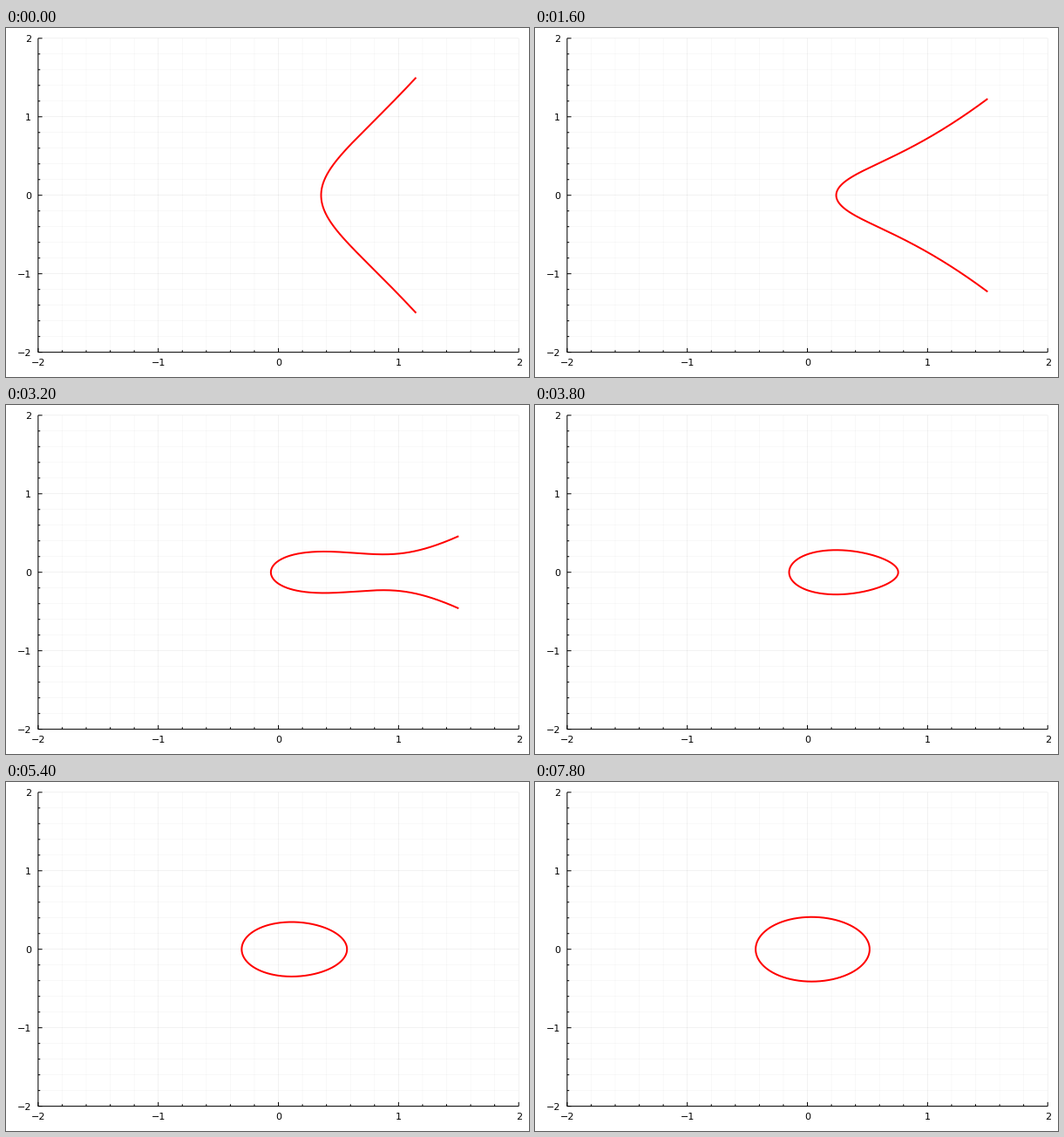
A matplotlib script for the animation above (8000 ms loop, 600 by 400 pixels).

```python
import numpy as np
import matplotlib.pyplot as plt
from matplotlib.animation import FuncAnimation
from matplotlib.collections import LineCollection

W, H, DPI = 600, 400, 100
LEFT, RIGHT, TOP, BOTTOM = 36.87, 588.19, 11.81, 371.61
FRAMES, STEPS = 40, 50
LIMIT = 1.5          # the curve is only traced for |x|, |y| <= LIMIT
PX = 72 / DPI        # one pixel in points


def sx(x):
    return LEFT + (x + 2) * (RIGHT - LEFT) / 4


def sy(y):
    return BOTTOM - (y + 2) * (BOTTOM - TOP) / 4


def real_roots(poly):
    r = np.roots(poly)
    return np.sort(r[np.abs(r.imag) < 1e-7].real)


def curve(p):
    """Zero set of (1-p)(y^2 - x^3 - x + 0.4) + p(4x^2 + 5y^2 - 1)."""
    q = 1 - p
    scale = q + 5 * p
    poly = np.array([q, -4 * p, q, p - 0.4 * q]) / scale
    roots = real_roots(poly)
    a = roots[0]
    closed = len(roots) > 1 and roots[1] < LIMIT
    u = np.linspace(0, 1, 250)
    if closed:
        x = a + (roots[1] - a) * (1 - np.cos(np.pi * u)) / 2
    else:
        top = real_roots(poly - [0, 0, 0, LIMIT ** 2])
        b = min([LIMIT] + [r for r in top if r > a])
        x = a + (b - a) * u ** 2
    y = np.sqrt(np.maximum(np.polyval(poly, x), 0))
    y[0] = 0
    if closed:
        y[-1] = 0
    return np.r_[x[::-1], x[1:]], np.r_[y[::-1], -y[1:]]


fig = plt.figure(figsize=(W / DPI, H / DPI), dpi=DPI, facecolor="white")
ax = fig.add_axes([0, 0, 1, 1])
ax.set_xlim(0, W)
ax.set_ylim(H, 0)
ax.axis("off")


def strokes(segs, width, alpha, z):
    lines = LineCollection(segs, colors="black", linewidths=width * PX,
                           alpha=alpha, zorder=z, capstyle="butt")
    lines.set_snap(False)
    ax.add_collection(lines, autolim=False)


def grid(values):
    return ([[(sx(v), TOP), (sx(v), BOTTOM)] for v in values]
            + [[(LEFT, sy(v)), (RIGHT, sy(v))] for v in values])


def ticks(values, size):
    return ([[(sx(v), BOTTOM), (sx(v), BOTTOM - size)] for v in values]
            + [[(LEFT, sy(v)), (LEFT + size, sy(v))] for v in values])


major = range(-2, 3)
minor = [i / 5 for i in range(-10, 11) if i % 5]

strokes(grid(major), 0.5, 0.1, 1)
strokes(grid(minor), 0.5, 0.05, 1)
strokes(ticks(major, 4.72) + ticks(minor, 2.36), 1, 1, 2)
strokes([[(LEFT, TOP), (LEFT, BOTTOM)], [(LEFT, BOTTOM), (RIGHT, BOTTOM)]],
        1, 1, 2)

font = dict(family="DejaVu Sans", size=8, color="black", va="baseline")
for v in major:
    label = str(v).replace("-", "\u2212")
    ax.text(sx(v), 387.2, label, ha="center", **font)
    ax.text(29.2, sy(v) + 4.1, label, ha="right", **font)

line, = ax.plot([], [], color="red", lw=2 * PX, zorder=3, snap=False,
                solid_capstyle="butt", solid_joinstyle="round")


def draw(i):
    x, y = curve(i / STEPS)
    line.set_data(sx(x), sy(y))
    return line,


anim = FuncAnimation(fig, draw, frames=FRAMES, init_func=lambda: draw(0),
                     interval=200, repeat=True, repeat_delay=0)
plt.show()
```
